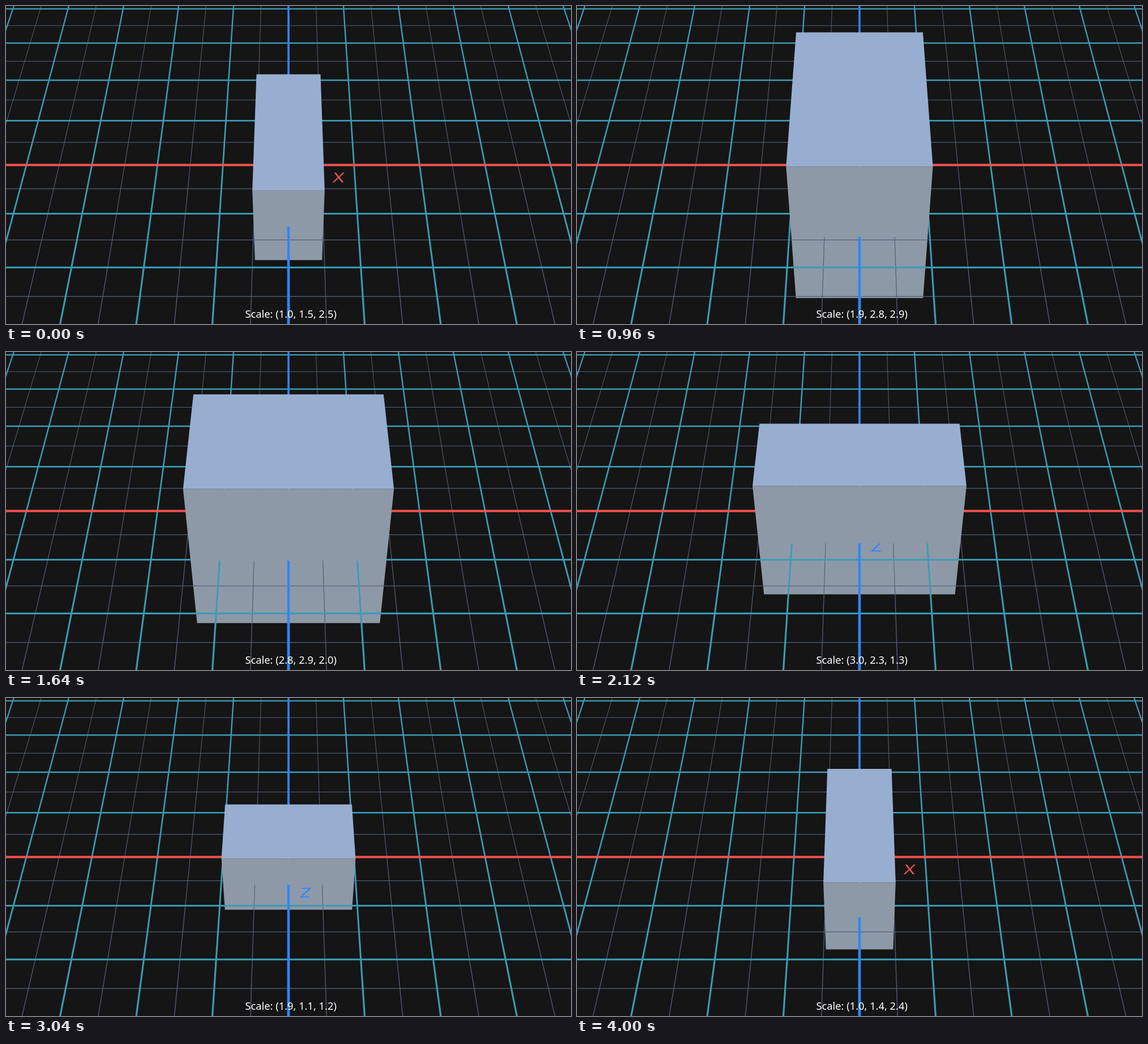
Animation of 998 by 561 pixels, one loop 4.04 s. Source, as an HTML page:

```html
<!DOCTYPE html>
<html lang="en">
<head>
<meta charset="utf-8">
<title>Scaling box</title>
<style>
  html, body { margin: 0; width: 100%; height: 100%; overflow: hidden; background: #151515; }
  svg { display: block; width: 100%; height: 100%; }
  text { font-family: "Noto Sans", "Open Sans", sans-serif; text-anchor: middle; }
</style>
</head>
<body>
<svg viewBox="0 0 998 561">
  <defs><clipPath id="clip"><polygon id="clipShape"/></clipPath></defs>
  <rect width="998" height="561" fill="#151515"/>
  <g id="ground"></g>
  <polygon id="front" fill="#8e99a7"/>
  <polygon id="top" fill="#98aed1"/>
  <g clip-path="url(#clip)"><use href="#ground"/></g>
  <text id="caption" x="503.2" y="550" font-size="18.3" fill="#fff"></text>
</svg>
<script>
const $ = id => document.getElementById(id);
const STEP = 40, STEPS = 101, LOOP = STEP * STEPS;
const DIST = 15, FOCAL = 1736.25, TILT = Math.SQRT1_2;
const CX = 499, CY = 280.5;
const RED = '#f2514f', BLUE = '#2e86ff', TEAL = '#3b9bb6', SLATE = '#52617b';

// The camera looks down at the origin at 45 degrees.
function project(x, y, z) {
  const k = FOCAL / (DIST - TILT * (y + z));
  return { x: CX + x * k, y: CY - TILT * (y - z) * k, zoom: k * DIST / FOCAL };
}

const points = list => list.map(p => p.x.toFixed(2) + ',' + p.y.toFixed(2)).join(' ');

function add(tag, attrs) {
  const el = document.createElementNS('http://www.w3.org/2000/svg', tag);
  for (const name in attrs) el.setAttribute(name, attrs[name]);
  return $('ground').appendChild(el);
}

function lineAlongX(z, width, fill) {
  const { y, zoom } = project(0, 0, z), h = width * zoom;
  add('rect', { x: 0, y: y - h / 2, width: 998, height: h, fill });
}

function lineAlongZ(x, width, fill) {
  const side = (z, sign) => {
    const p = project(x, 0, z);
    return { x: p.x + sign * width * p.zoom / 2, y: p.y };
  };
  add('polygon', { points: points([side(-5, -1), side(-5, 1), side(3.5, 1), side(3.5, -1)]), fill });
}

function label(letter, x, y, fill) {
  add('text', { transform: `matrix(1 0 -.1 ${TILT} ${x} ${y})`, 'font-size': 34, fill })
    .textContent = letter;
}

function buildGround() {
  for (let i = -6; i < 6; i++) {
    lineAlongX(i + 0.5, 1.15, SLATE);
    lineAlongZ(i + 0.5, 1.15, SLATE);
  }
  for (let i = -6; i <= 6; i++) {
    if (!i) continue;
    lineAlongX(i, 2.8, TEAL);
    lineAlongZ(i, 2.8, TEAL);
  }
  lineAlongX(0, 4.1, RED);
  lineAlongZ(0, 4.2, BLUE);
  label('X', 586.5, 311, RED);
  label('Z', 528, 351.5, BLUE);
}

// One turn takes 100 steps; the last two steps come in reverse order.
function angleAt(time) {
  const step = Math.floor(time % LOOP / STEP);
  return (step < 99 ? step : 199 - step) * Math.PI / 50;
}

function draw(time) {
  const angle = angleAt(time);
  const scale = [0, 1, 2].map(i => 2 - Math.cos(angle + i * Math.PI / 3));
  const [w, h, d] = scale.map(s => s / 2);
  const edge = (y, z) => [project(-w, y, z), project(w, y, z)];
  const face = (a, b) => points([...a, ...b.reverse()]);

  $('top').setAttribute('points', face(edge(h, -d), edge(h, d)));
  $('front').setAttribute('points', face(edge(h, d), edge(-h, d)));
  // Only the ground nearer than the front face covers the box.
  $('clipShape').setAttribute('points', face(edge(0, d), edge(-h, d)));
  $('caption').textContent = `Scale: (${scale.map(s => s.toFixed(1)).join(', ')})`;
}

function tick() {
  draw(performance.now());
  requestAnimationFrame(tick);
}

buildGround();
tick();
</script>
</body>
</html>
```
